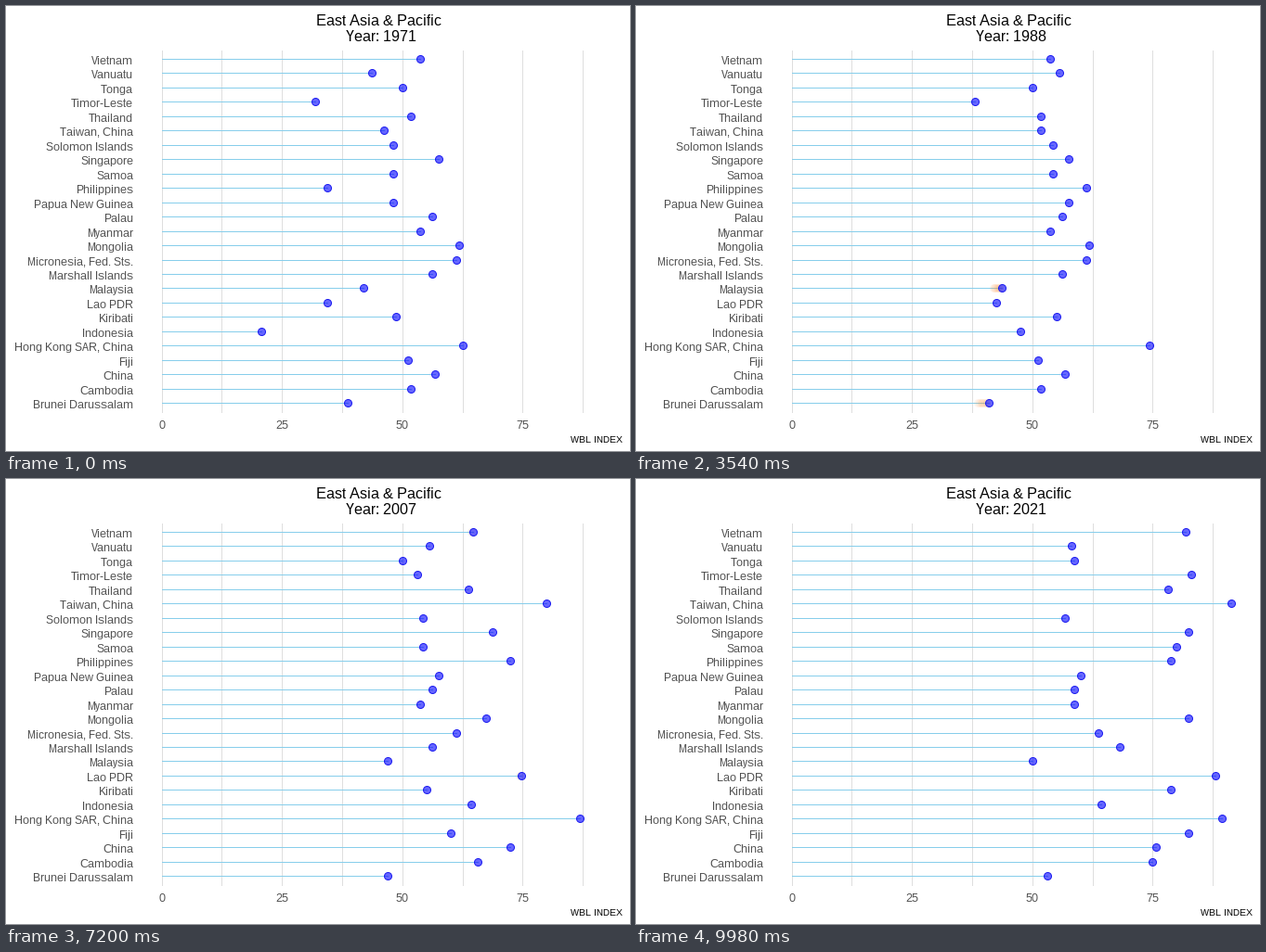
A matplotlib script that plays this animation: 672x480 px, repeating every 10000 ms.

```python
import numpy as np
import matplotlib.pyplot as plt
from matplotlib.animation import FuncAnimation
from matplotlib.collections import LineCollection

plt.rcParams.update({
    "font.family": "Liberation Sans",
    "text.hinting": "native",
    "text.hinting_factor": 1,
    "text.kerning_factor": 6,
})

W, H, DPI = 672, 480, 96
FRAMES, INTERVAL = 500, 20
FIRST, LAST = 1971, 2021
PX = 72 / DPI  # points per pixel

# Index scores in the first year, top row first
START = {
    "Vietnam": 53.75, "Vanuatu": 43.75, "Tonga": 50, "Timor-Leste": 31.875,
    "Thailand": 51.875, "Taiwan, China": 46.25, "Solomon Islands": 48.125,
    "Singapore": 57.5, "Samoa": 48.125, "Philippines": 34.375,
    "Papua New Guinea": 48.125, "Palau": 56.25, "Myanmar": 53.75,
    "Mongolia": 61.875, "Micronesia, Fed. Sts.": 61.25,
    "Marshall Islands": 56.25, "Malaysia": 41.875, "Lao PDR": 34.375,
    "Kiribati": 48.75, "Indonesia": 20.625, "Hong Kong SAR, China": 62.5,
    "Fiji": 51.25, "China": 56.875, "Cambodia": 51.875,
    "Brunei Darussalam": 38.75,
}

# Scores that change in a year, keyed by the first letters of the label
REFORMS = {
    1972: dict(Hong=65.625),
    1973: dict(Phil=39.375),
    1974: dict(Hong=71.875),
    1975: dict(Indo=45),
    1977: dict(Timo=38.125, Lao=40),
    1978: dict(Solo=54.375, Samo=54.375),
    1979: dict(Kiri=55, Indo=47.5),
    1980: dict(Vanu=46.25),
    1982: dict(Papu=57.5),
    1983: dict(Vanu=49.375),
    1985: dict(Hong=74.375, Lao=42.5),
    1986: dict(Taiw=51.875),
    1987: dict(Vanu=55.625),
    1988: dict(Phil=61.25),
    1989: dict(Brun=41.875, Mala=44.375),
    1990: dict(Sing=65.625, Camb=54.375),
    1991: dict(Lao=53.125),
    1992: dict(Mong=67.5),
    1993: dict(Chin=59.375),
    1995: dict(Viet=56.875, Lao=58.75, Camb=56.875),
    1996: dict(Viet=64.375, Phil=70),
    1997: dict(Taiw=60.625, Hong=86.875),
    1998: dict(Thai=63.75, Sing=68.75, Camb=63.125),
    1999: dict(Timo=40.625, Mala=46.875, Indo=50),
    2000: dict(Fiji=57.5, Chin=62.5),
    2001: dict(Lao=68.125, Brun=46.875),
    2003: dict(Timo=53.125, Taiw=80),
    2004: dict(Phil=72.5, Indo=64.375),
    2005: dict(Lao=74.375, Fiji=60),
    2006: dict(Chin=72.5),
    2007: dict(Camb=65.625),
    2008: dict(Viet=67.5, Lao=77.5),
    2009: dict(Taiw=85, Fiji=74.375, Brun=53.125),
    2010: dict(Sing=76.25, Phil=78.75),
    2011: dict(Thai=75, Mong=80),
    2012: dict(Timo=77.5, Myan=58.75, Chin=75.625),
    2013: dict(Viet=76.25, Taiw=91.25, Samo=80, Pala=58.75),
    2014: dict(Vanu=58.125, Tong=58.75, Mala=50, Lao=88.125, Kiri=61.25),
    2015: dict(Papu=60, Mars=58.75, Camb=75),
    2016: dict(Hong=89.375),
    2017: dict(Thai=78.125, Kiri=78.75),
    2018: dict(Timo=83.125, Mong=82.5),
    2019: dict(Solo=56.875, Micr=63.75, Fiji=82.5),
    2020: dict(Sing=82.5, Mars=68.125),
    2021: dict(Viet=81.875),
}

LABELS = list(START)
ROW = {label[:4].strip(): i for i, label in enumerate(LABELS)}
# Whole pixel rows, nudged off the edge so that they snap the same way
ROW_Y = np.floor(57.5 + 15.466 * np.arange(len(LABELS))) + 0.25


def score_table():
    current = np.array(list(START.values()), float)
    rows = [current.copy()]
    for year in range(FIRST + 1, LAST + 1):
        for key, value in REFORMS.get(year, {}).items():
            current[ROW[key]] = value
        rows.append(current.copy())
    return np.array(rows)


SCORES = score_table()
STEPS = LAST - FIRST
KEYS = np.array([round((FRAMES - 1) * k / STEPS) for k in range(STEPS + 1)])


def to_x(score):
    return 167.62 + 5.183 * np.asarray(score)


def scores_at(n):
    return np.array([np.interp(n, KEYS, column) for column in SCORES.T])


def year_at(n):
    if n == FRAMES - 1:
        return LAST
    return FIRST + max(0, int(np.searchsorted(KEYS, n)) - 1)


def wake_at(n):
    """Earlier positions of the dots on the move within the current year."""
    if n in KEYS:
        return [], []
    k = int(np.searchsorted(KEYS, n)) - 1
    moving = SCORES[k] != SCORES[k + 1]
    past = range(KEYS[k], n)
    xs = [to_x(scores_at(m)[moving]) for m in past]
    return np.concatenate(xs), np.tile(ROW_Y[moving], len(xs))


fig = plt.figure(figsize=(W / DPI, H / DPI), dpi=DPI, facecolor="white")
ax = fig.add_axes([0, 0, 1, 1])
ax.set(xlim=(0, W), ylim=(H, 0))
ax.axis("off")


def write(x, y, text, size, color="black", ha="center"):
    return ax.text(x, y, text, fontsize=size * PX, color=color, ha=ha,
                   va="baseline")


grid_x = to_x(np.arange(0, 100, 12.5))
ax.add_collection(LineCollection([[(x, 48), (x, 438)] for x in grid_x],
                                 colors="#DEDEDE", linewidths=PX,
                                 antialiaseds=False, zorder=1))
for tick in (0, 25, 50, 75):
    write(to_x(tick), 456, str(tick), 12, "#4D4D4D")
for label, y in zip(LABELS, ROW_Y):
    write(137, y + 5.75, label, 12, "#4D4D4D", "right")
write(401.5, 21, "East Asia & Pacific", 16)
write(664, 471, "WBL INDEX", 10, ha="right")
year_text = write(403.5, 38, "", 16)

stems = LineCollection([], colors="#87CEEB", linewidths=PX,
                       antialiaseds=False, zorder=2)
ax.add_collection(stems)
wake, = ax.plot([], [], "o", ms=9 * PX, mew=0, color="#FF8C28", alpha=0.08,
                zorder=3)
dots, = ax.plot([], [], "o", ms=8 * PX, mew=PX, mec="#1C1CF0",
                mfc=(0, 0, 1, 0.6), zorder=4)


def draw(n):
    xs = to_x(scores_at(n))
    stems.set_segments([[(168, y), (x, y)] for x, y in zip(xs, ROW_Y)])
    dots.set_data(xs, ROW_Y)
    wake.set_data(*wake_at(n))
    year_text.set_text(f"Year: {year_at(n)}")
    return stems, wake, dots, year_text


anim = FuncAnimation(fig, draw, frames=FRAMES, interval=INTERVAL,
                     repeat=True, repeat_delay=0, blit=False)
plt.show()
```
